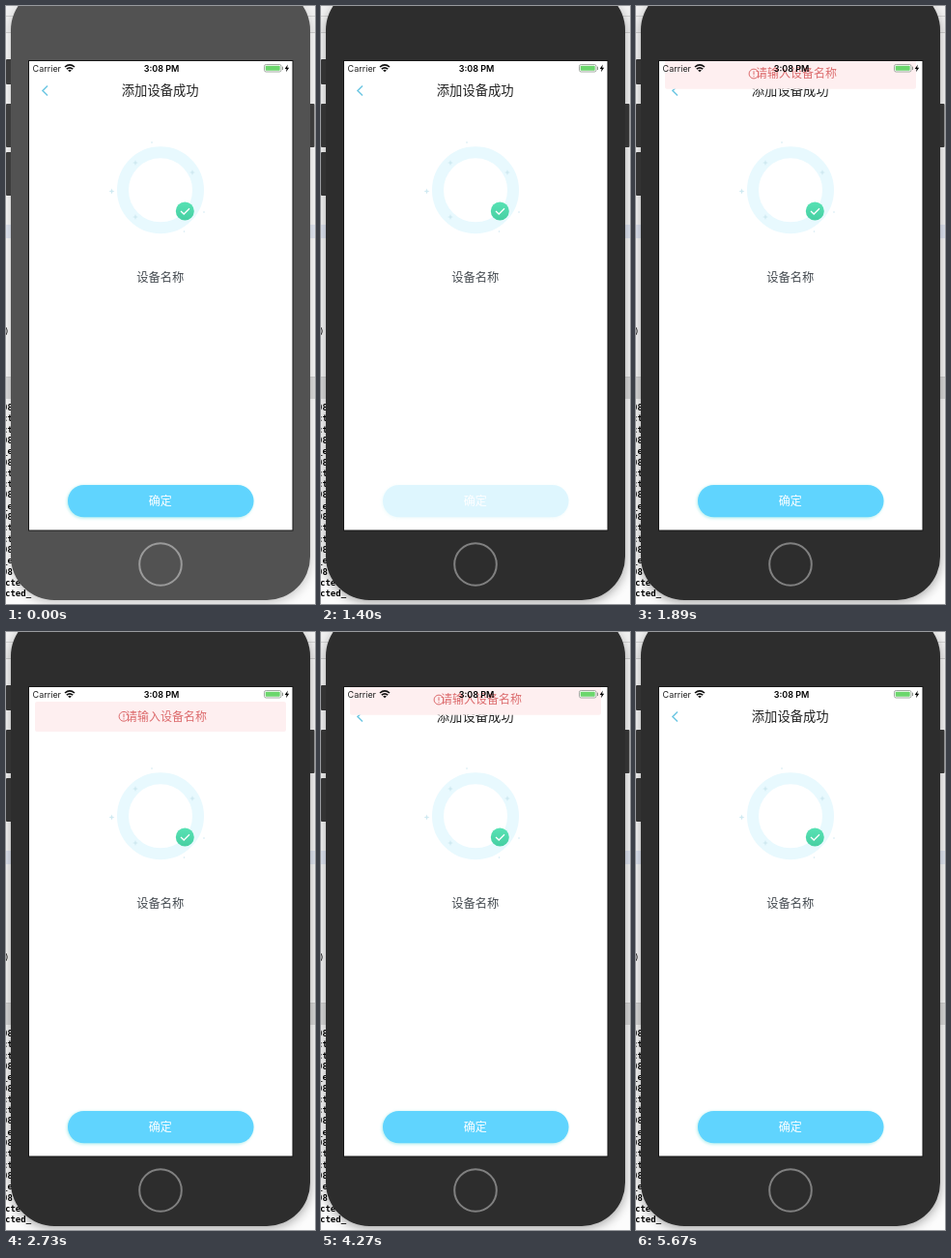
Animation of 320x618 px, one loop 6160 ms. Source, as an HTML page:

```html
<!DOCTYPE html>
<html lang="zh">
<head>
<meta charset="utf-8">
<style>
  html, body { margin: 0; height: 100%; overflow: hidden; background: #fff; }
  svg { display: block; }
  text { font-family: "Noto Sans CJK SC", "Noto Sans CJK", sans-serif; text-anchor: middle; }
  .status { font: 9px Inter, sans-serif; }
  #log text { font: bold 9px "DejaVu Sans Mono", monospace; text-anchor: start; }
</style>
</head>
<body>
<svg width="320" height="618" viewBox="0 0 320 618">
  <defs>
    <filter id="blur" x="-20%" y="-20%" width="140%" height="140%"><feGaussianBlur stdDeviation="6"/></filter>
    <filter id="glow" x="-10%" y="-50%" width="120%" height="200%"><feGaussianBlur stdDeviation="1.5"/></filter>
    <linearGradient id="green" x2="0" y2="1"><stop stop-color="#58e2b4"/><stop offset="1" stop-color="#46cfa2"/></linearGradient>
    <clipPath id="screen"><path d="M24 57H296.500V541.500H24Z"/></clipPath>
    <path id="spark" d="M0 -3L.8 -.8L3 0L.8 .8L0 3L-.8 .8L-3 0L-.8 -.8Z"/>
  </defs>

  <!-- desktop -->
  <path fill="#fcfcfc" d="M0 0H320V618H0Z"/>
  <path fill="#f1f1f1" d="M0 0H320V27H0Z"/>
  <path fill="#e5ebf7" d="M0 226H320V240H0Z"/>
  <path fill="#dedede" d="M0 384H320V406H0Z"/>
  <path stroke="#d2d2d2" d="M0 10.500H320M0 27.500H320M0 383.500H320"/>
  <g id="log"><text x="-2" y="339" style="font-weight:400">)</text></g>
  <rect id="shade" x="5" y="-14" width="310" height="630" rx="45" filter="url(#blur)"/>

  <!-- phone -->
  <g id="keys">
    <rect x="0" y="55" width="7" height="26" rx="1"/>
    <rect x="0" y="101" width="7" height="45" rx="1"/>
    <rect x="0" y="151" width="7" height="45" rx="1"/>
    <rect x="313" y="101" width="6.500" height="45" rx="1"/>
  </g>
  <rect id="body" x="5" y="-20" width="310" height="634" rx="45"/>
  <circle id="home" cx="160" cy="577" r="21.800" fill="none" stroke-width="2"/>
  <path fill="#181818" d="M23 56H297.500V542.500H23Z"/>
  <path fill="#fff" d="M24 57H296.500V541.500H24Z"/>

  <!-- page -->
  <path d="M43 82.500L38 87.500L43 92.500" fill="none" stroke="#72c9e4" stroke-width="1.600"/>
  <text x="159.700" y="92" font-size="13.300" fill="#222">添加设备成功</text>
  <circle cx="160" cy="190.300" r="39" fill="none" stroke="#e8f9fe" stroke-width="12"/>
  <g fill="#cfe9f1">
    <use href="#spark" x="134" y="162"/><use href="#spark" x="193" y="172"/>
    <use href="#spark" x="134" y="218"/><use href="#spark" x="109.500" y="191.500"/>
    <circle cx="151" cy="141" r=".8"/><circle cx="205" cy="213" r=".8"/><circle cx="184.500" cy="233" r=".8"/>
  </g>
  <circle cx="185.300" cy="212" r="9.500" fill="url(#green)"/>
  <path d="M181 212L184.200 215L190 209.300" fill="none" stroke="#fff" stroke-width="1.300"/>
  <text x="159.800" y="284.500" font-size="12.300" fill="#444a50">设备名称</text>
  <g id="button">
    <rect x="63" y="495.500" width="193" height="34" rx="17" fill="#b5efee" filter="url(#glow)"/>
    <rect x="64" y="495" width="192.500" height="33.300" rx="16.600" fill="#60d4fe"/>
    <text x="159.800" y="516" font-size="12" font-weight="500" fill="#fff">确定</text>
  </g>

  <g clip-path="url(#screen)">
    <g id="banner">
      <rect x="30" y="72" width="260" height="31" rx="2" fill="#feeff0"/>
      <circle cx="122" cy="87.300" r="4.900" fill="none" stroke="#dc6a6c"/>
      <path d="M122 84.500V88.300M122 89.300V90.400" stroke="#dc6a6c"/>
      <text x="166" y="91.500" font-size="12" fill="#dc6a6c">请输入设备名称</text>
    </g>
  </g>

  <!-- status bar -->
  <text class="status" x="42.300" y="67.500" fill="#222">Carrier</text>
  <text class="status" x="161" y="67.700" style="font-weight:600">3:08 PM</text>
  <g fill="none" stroke="#111" stroke-width="1.600">
    <path d="M61 63Q66 58.600 71 63M62.800 65.200Q66 62.400 69.200 65.200"/>
    <path fill="#111" stroke="none" d="M66 68.300L64.200 66.500Q66 65 67.800 66.500Z"/>
  </g>
  <rect x="267.500" y="60.500" width="17.500" height="7.500" rx="1.800" fill="#fff" stroke="#8d968d" stroke-width=".8"/>
  <rect x="268.700" y="61.700" width="15" height="5.100" rx=".8" fill="#6bd66c"/>
  <path d="M286.500 62.700V66" stroke="#8d968d"/>
  <path d="M291.800 60.500L288.700 65H290.600L290 68.300L293.200 63.700H291.200Z"/>
</svg>
<script>
  const LOOP = 6160, STEP = 70;
  const $ = id => document.getElementById(id);
  const clamp = v => Math.min(1, Math.max(0, v));
  const ease = v => v < .5 ? 2 * v * v : 1 - 2 * (1 - v) ** 2;
  const ramp = (t, from, to) => clamp((t - from) / (to - from));

  const log = "98 ct ct 98 _e 98 ct ct 98 _e 98 ct ct 98 _e 98 cted cted_".split(" ");
  log.forEach((word, i) => {
    const line = document.createElementNS("http://www.w3.org/2000/svg", "text");
    line.setAttribute("x", word.length > 2 ? -1 : -4);
    line.setAttribute("y", 418 + i * 11.3);
    line.textContent = word;
    $("log").append(line);
  });

  function draw(t) {
    const active = t >= 1400;
    $("body").style.fill = active ? "#2d2d2d" : "#525252";
    $("keys").style.fill = active ? "#333" : "#3c3c3c";
    $("home").style.stroke = active ? "#808080" : "#9a9a9a";
    $("shade").style.opacity = active ? .38 : .25;

    $("button").style.opacity = active ? .2 + .8 * ease(ramp(t, 1560, 1800)) : 1;

    const shown = ease(ramp(t, 1610, 2100)) - ease(ramp(t, 4060, 4550));
    $("banner").setAttribute("transform", `translate(0 ${-47 * (1 - shown)})`);
  }

  function tick() {
    const t = performance.now() % LOOP;
    draw(Math.floor(t / STEP) * STEP);
    requestAnimationFrame(tick);
  }
  tick();
</script>
</body>
</html>
```
